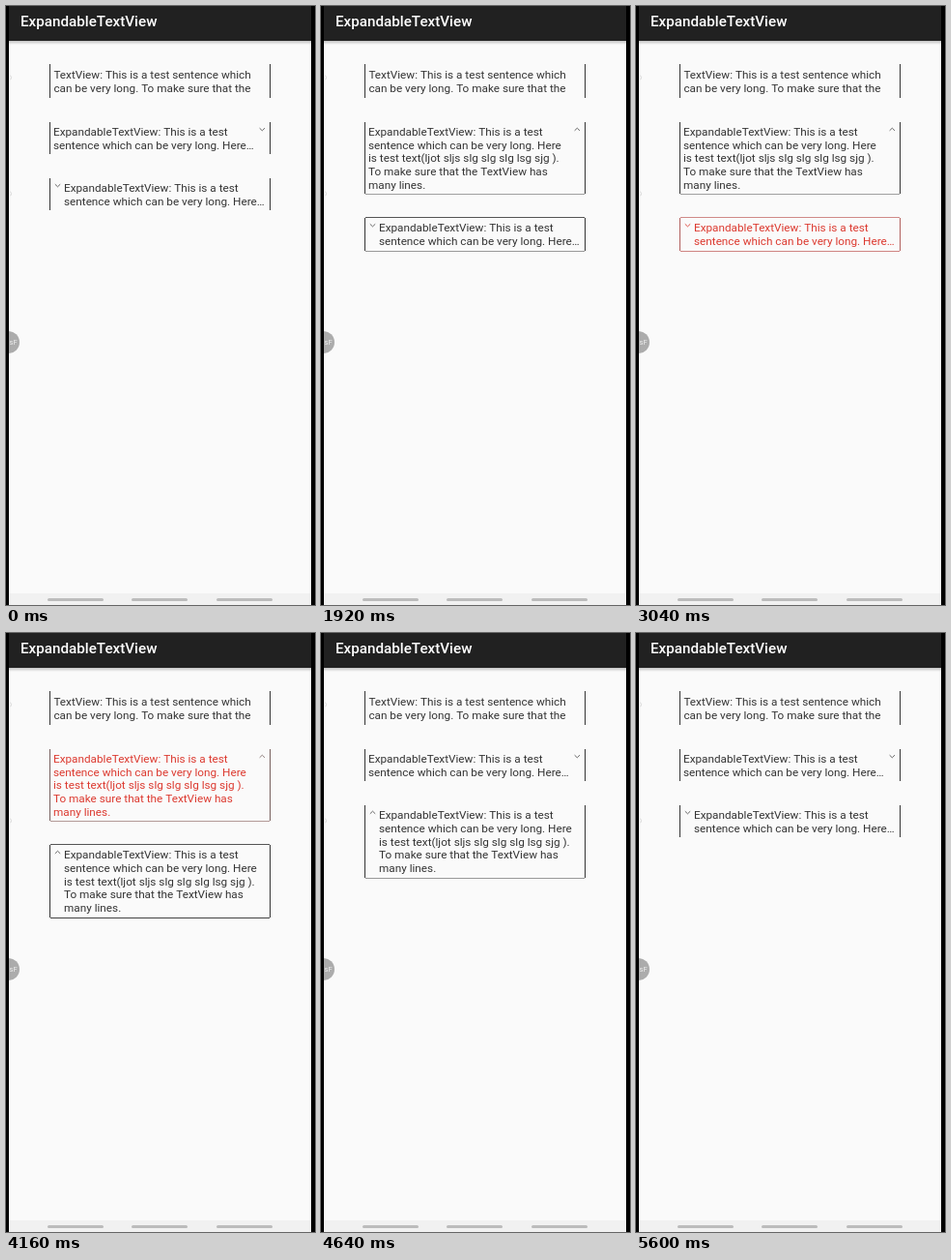
An HTML page with a canvas that plays this animation: 320 px wide and 619 px high, repeating every 9.6 s.

```html
<!DOCTYPE html>
<html lang="en">
<head>
<meta charset="utf-8">
<title>ExpandableTextView</title>
<style>
html, body { margin: 0; width: 100%; height: 100%; overflow: hidden; background: #000; }
canvas { display: block; width: 320px; height: 619px; }
</style>
</head>
<body>
<canvas id="stage"></canvas>
<script>
const W = 320, H = 619, LOOP = 9600;
const canvas = document.getElementById('stage');
const ctx = canvas.getContext('2d');
const ratio = window.devicePixelRatio || 1;
canvas.width = W * ratio;
canvas.height = H * ratio;

const INK = '#343434', RED = '#dc3a30';
const FAMILY = 'Roboto, sans-serif';
const PITCH = 13.75;

const PLAIN = ['TextView: This is a test sentence which', 'can be very long. To make sure that the'];
const OPEN = [
  'ExpandableTextView: This is a test',
  'sentence which can be very long. Here',
  'is test text(ljot sljs slg slg slg lsg sjg ).',
  'To make sure that the TextView has',
  'many lines.'
];
const SHUT = [OPEN[0], OPEN[1] + '…'];

// [start, second open, third open, pressed box]
const STATES = [
  [0, false, false, 0],
  [1760, false, false, 2],
  [1920, true, false, 0],
  [3040, true, false, 3],
  [3200, true, true, 0],
  [4160, true, true, 2],
  [4640, false, true, 0],
  [5280, false, true, 3],
  [5600, false, false, 0]
];

function rect(x, y, w, h, color) {
  ctx.fillStyle = color;
  ctx.fillRect(x, y, w, h);
}

function text(str, x, y, size, color, weight = 400) {
  ctx.font = `${weight} ${size}px ${FAMILY}`;
  ctx.fillStyle = color;
  ctx.fillText(str, x, y);
}

function lines(list, x, y, color) {
  list.forEach((str, i) => text(str, x, y + i * PITCH, 11.75, color));
}

function border(top, bottom, side, topEdge, bottomEdge) {
  const a = topEdge ? 1 : 0, b = bottomEdge ? 1 : 0;
  for (const x of [45, 273]) rect(x, top + a, 1, bottom - top - a - b, side);
  if (topEdge) rect(46, top, 227, 1, topEdge);
  if (bottomEdge) rect(46, bottom - 1, 227, 1, bottomEdge);
}

function chevron(x, y, up, color) {
  const d = up ? -1.3 : 1.3;
  ctx.beginPath();
  ctx.moveTo(x - 2.7, y - d);
  ctx.lineTo(x, y + d);
  ctx.lineTo(x + 2.7, y - d);
  ctx.strokeStyle = color;
  ctx.lineWidth = 0.9;
  ctx.stroke();
}

function sideMark(y) {
  ctx.beginPath();
  ctx.arc(2.5, y, 3, -0.9, 0.9);
  ctx.strokeStyle = '#d2d2d2';
  ctx.lineWidth = 0.8;
  ctx.stroke();
}

function screen() {
  rect(0, 0, W, H, '#000');
  rect(3, 0, 313, H, '#fafafa');
  rect(3, 0, 313, 36, '#212121');
  const shade = ctx.createLinearGradient(0, 36, 0, 40);
  shade.addColorStop(0, 'rgba(0,0,0,.22)');
  shade.addColorStop(1, 'rgba(0,0,0,0)');
  rect(3, 36, 313, 4, shade);
  text('ExpandableTextView', 15, 20.6, 15.2, '#fff', 500);

  rect(3, 607, 313, 12, '#f1f1f1');
  ctx.fillStyle = '#bcbcbc';
  for (const x of [43, 130, 218]) {
    ctx.beginPath();
    ctx.roundRect(x, 612, 58, 3, 1.5);
    ctx.fill();
  }

  ctx.save();
  ctx.beginPath();
  ctx.rect(3, 36, 313, 560);
  ctx.clip();
  sideMark(74);
  sideMark(194);
  ctx.beginPath();
  ctx.arc(2.5, 347.5, 11.5, 0, 7);
  ctx.fillStyle = '#acacac';
  ctx.fill();
  text('sF', 3.6, 350.2, 7.5, '#eee');
  ctx.restore();
}

function draw(time) {
  const t = time % LOOP;
  const [, open2, open3, pressed] = STATES.filter(s => s[0] <= t).pop();
  const red2 = pressed === 2, red3 = pressed === 3;

  ctx.setTransform(ratio, 0, 0, ratio, 0, 0);
  screen();

  border(60, 95, INK);
  lines(PLAIN, 49.4, 75.4, INK);

  border(120, open2 ? 195 : 153, red2 ? '#77605e' : INK, null, open2 && (red2 ? '#b39a98' : '#a0a0a0'));
  lines(open2 ? OPEN : SHUT, 49, 133.9, red2 ? RED : INK);
  chevron(265.3, 127.5, open2, red2 ? '#857270' : '#555');

  const top = open2 ? 218 : 178;
  const bottom = open3 ? (open2 ? 295 : 254) : (open2 ? 254 : 211);
  const topEdge = open2 && (red3 ? '#d08a88' : '#555');
  const bottomEdge = (open2 || open3) && (red3 ? '#cf8583' : open2 && open3 ? '#444' : '#999');
  border(top, bottom, red3 ? '#b0605e' : INK, topEdge, bottomEdge);
  const base = open2 ? 233.2 : 192.1;
  lines(open3 ? OPEN : SHUT, 60, base, red3 ? RED : INK);
  chevron(53.5, base - 6.6, open3, red3 ? RED : '#555');
}

const start = performance.now();
function tick() {
  draw(performance.now() - start);
  requestAnimationFrame(tick);
}
tick();
</script>
</body>
</html>
```
